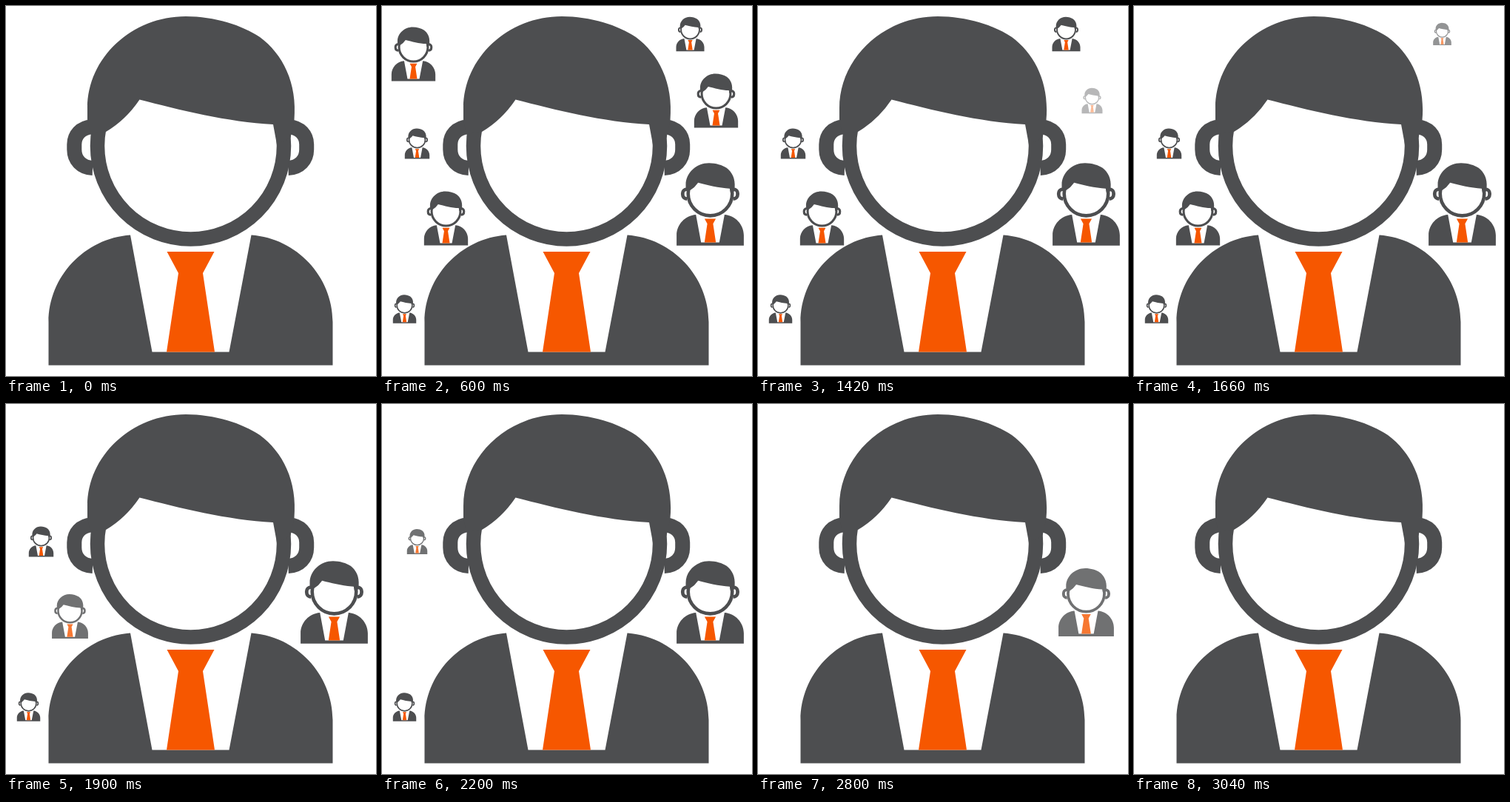
These frames come from a looping animation (500x500 px, 4.71 s). An HTML page:

```html
<!DOCTYPE html>
<html lang="en">
<head>
<meta charset="utf-8">
<title>People</title>
<style>
  html, body { margin: 0; width: 100%; height: 100%; overflow: hidden; background: #fff; }
  svg { display: block; width: 100%; height: 100%; }
</style>
</head>
<body>
<svg id="stage" viewBox="0 0 500 500">
  <defs>
    <g id="person" fill="#4d4e50">
      <path d="M57.5 485.5V427C57.5 366 106 314 168 309.5L197.5 467.5H301.5L331.5 309.5C393 314 441.5 366 441.5 427V485.5Z"/>
      <path fill="#f65700" d="M217.5 332H281.5L266 361L282 467.5H217L233 361Z"/>
      <g fill="none" stroke="#4d4e50" stroke-width="20">
        <circle cx="249.5" cy="189" r="126" stroke-width="19.5"/>
        <path id="ear" d="M116 163.5C101 164 92.3 175 92.3 187V194C92.3 208 102 218.5 117 219"/>
        <use href="#ear" transform="matrix(-1 0 0 1 498.5 0)"/>
      </g>
      <path d="M110 154V138C110 70 170 14 243 14C282 14 319 26 343 42C374 65 394 104 389.5 154L384.5 178L366 187L361 160C300 157 233 140 180.5 126.5Q162 154 135 170L114 173Z"/>
    </g>
  </defs>
  <use href="#person"/>
</svg>
<script>
const LOOP = 4710, STEP = 30, FADE_STEPS = 20, OUT_START = 940, OUT_STEPS = 10;

// Centre x, centre y, scale; in order of leaving
const crowd = [
  [42.5, 65, .1545], [451.5, 128, .1545], [416.5, 38, .099], [86.5, 287, .1545],
  [47.5, 186, .087], [30.5, 409.5, .082], [443.5, 268, .2365]
];
const stage = document.getElementById('stage');
const icons = crowd.map(() => {
  const icon = document.createElementNS('http://www.w3.org/2000/svg', 'use');
  icon.setAttribute('href', '#person');
  return stage.appendChild(icon);
});
const clamp = v => Math.min(1, Math.max(0, v));

function draw(t) {
  const fadeIn = clamp(Math.floor(t / STEP) / FADE_STEPS);
  const outStep = Math.floor((t - OUT_START) / STEP);
  crowd.forEach(([x, y, size], i) => {
    const out = clamp(outStep / OUT_STEPS - i);
    const s = size * (1 - .88 * out);
    icons[i].setAttribute('transform', `translate(${x} ${y}) scale(${s}) translate(-249.5 -250)`);
    icons[i].setAttribute('opacity', fadeIn * (1 - out));
  });
}

const start = performance.now();
function tick() {
  draw((performance.now() - start) % LOOP);
  requestAnimationFrame(tick);
}
tick();
</script>
</body>
</html>
```
